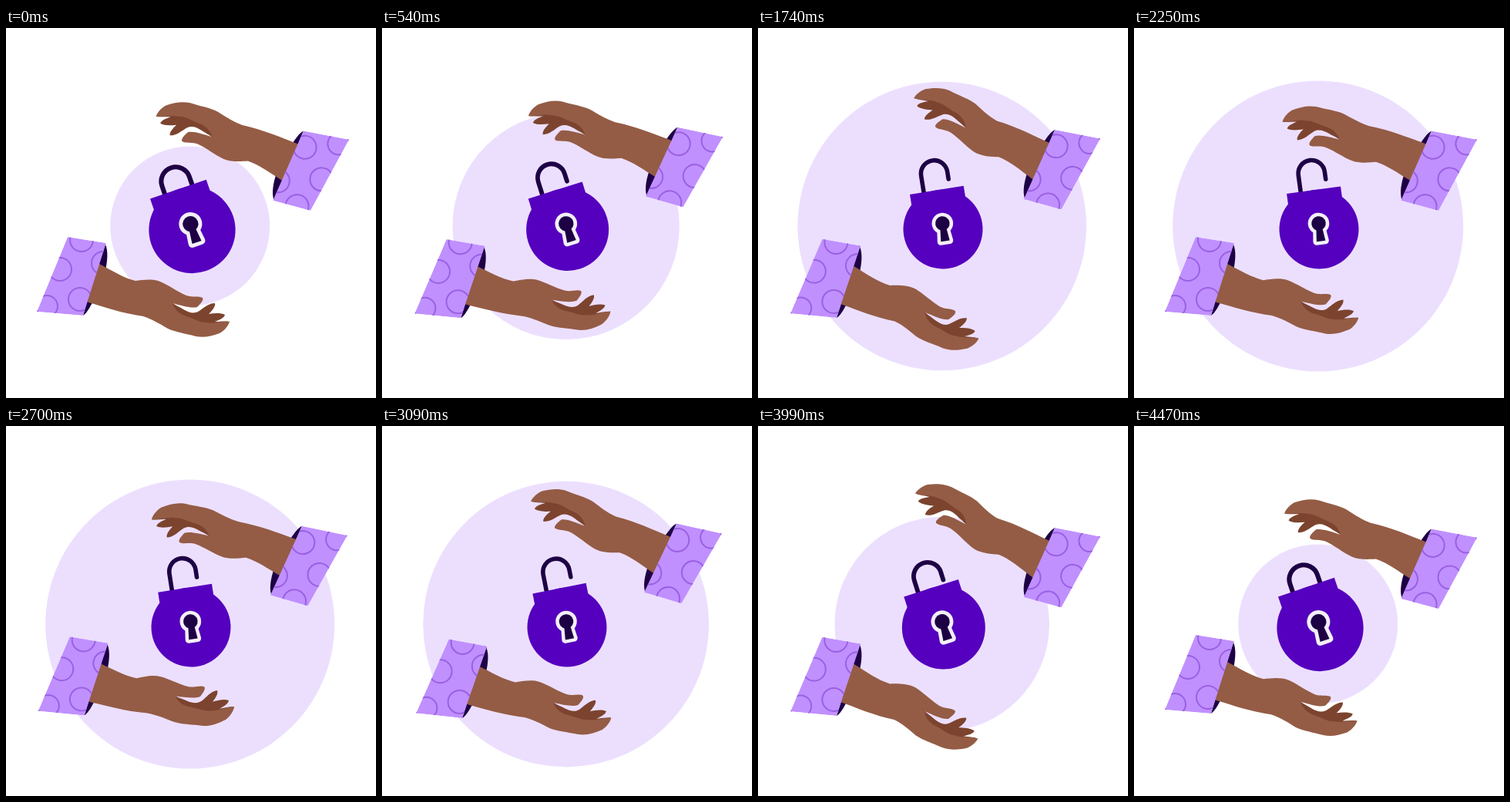
An HTML page that plays this animation: 480 px wide and 480 px high, repeating every 4500 ms.

```html
<!DOCTYPE html>
<html lang="en">
<head>
<meta charset="utf-8">
<title>Hands and padlock</title>
<style>
html, body { margin: 0; width: 100%; height: 100%; overflow: hidden; background: #fff; }
svg { display: block; width: 100vw; height: 100vh; }
</style>
</head>
<body>
<svg viewBox="0 0 480 480">
  <defs>
    <clipPath id="cuff"><path d="M40,368 L80,271 L130,279 L100,373Z"/></clipPath>
    <path id="star" d="M0,-1 Q.16,-.16 1,0 Q.16,.16 0,1 Q-.16,.16 -1,0 Q-.16,-.16 0,-1Z"/>
    <g id="sleeve" clip-path="url(#cuff)">
      <path d="M40,368 L80,271 L130,279 L100,373Z" fill="#c090ff"/>
      <g fill="none" stroke="#9a60e2" stroke-width="2">
        <circle cx="98" cy="275" r="15"/>
        <circle cx="70" cy="313" r="15"/>
        <circle cx="126" cy="305" r="15"/>
        <circle cx="96" cy="352" r="15"/>
        <circle cx="53" cy="361" r="14"/>
      </g>
    </g>
    <path id="lining" fill="#1e0045" d="M128,278.700 C136,292 129,325 117,346 C110,361 105,370 100,373Z"/>
  </defs>
  <circle id="halo" cx="238.700" cy="257" fill="#ecdffe"/>
  <g id="stars" fill="#c79bfc"></g>
  <g id="lock">
    <path id="shackle" d="M-17,-40 V-73 A17.200 17.200 0 0 1 17.400,-73 V-63" fill="none"
      stroke="#1e0045" stroke-width="5.600" stroke-linecap="round"/>
    <g fill="#5500be">
      <circle r="51.500"/>
      <rect x="-35.300" y="-51.300" width="70.600" height="18"/>
    </g>
    <g transform="translate(.5 -7.500)">
      <g fill="#f3f0f8" stroke="#f3f0f8" stroke-width="9" stroke-linejoin="round">
        <circle r="9.300"/><path d="M-3.500,5 L-5.800,23.200 H5.800 L3.500,5Z"/>
      </g>
      <g fill="#1e0045">
        <circle r="9.300"/><path d="M-3.800,5 L-5.800,23.200 H5.800 L3.800,5Z"/>
      </g>
    </g>
  </g>
  <g id="arms"></g>
</svg>
<script>
const LOOP = 4500, HALF = LOOP / 2, TAU = Math.PI * 2;
const $ = id => document.getElementById(id);
const clamp = v => Math.max(0, Math.min(1, v));
const ease = v => (1 - Math.cos(Math.PI * clamp(v))) / 2;
const wave = phase => (1 - Math.cos(TAU * phase)) / 2;

function add(parent, tag, attrs) {
  const el = document.createElementNS("http://www.w3.org/2000/svg", tag);
  for (const k in attrs) el.setAttribute(k, attrs[k]);
  return parent.appendChild(el);
}

const FINGERS = "M214,355 C221,361 226,362 230,365 C237,369 243,371 249,368 C256,364 262,357 271,357 " +
  "C272,361 268,366 263,371 C270,370 278,369 284,372 C283,376 278,378 271,381 " +
  "C278,381 284,380 290,381 L270,390 C248,391 220,384 214,355Z";
const SKIN = "M98,294 L121,306 C138,315 152,324 168,328 C176,327 190,325 200,329 " +
  "C212,334 222,342 234,347 C242,350 250,347 255,350 C257,353 252,358 248,362 " +
  "C240,364 228,360 216,357 C219,366 225,371 234,374 C244,377 250,382 260,382 " +
  "C270,384 280,380 290,381 C288,388 281,394 277,396 C266,400 257,402 246,400 " +
  "C232,396 221,395 210,390 C198,383 190,378 178,374 C150,370 128,362 107,356 L94,351Z";

function turn([x, y], cx, cy, a) {
  const c = Math.cos(a), s = Math.sin(a), dx = x - cx, dy = y - cy;
  return [cx + dx * c - dy * s, cy + dx * s + dy * c];
}

// Rotates the forearm at the cuff and the hand at the wrist.
function bend(path, h) {
  return path.replace(/([\d.]+),([\d.]+)/g, (_, x, y) => {
    const wrist = ease((x - 150) / 60);
    const p = turn([+x, +y], 182, 352, 0.085 * h * wrist);
    return turn(p, 112, 333, 0.062 * h).map(v => v.toFixed(2)).join();
  });
}

function makeArm(transform) {
  const root = add($("arms"), "g", { transform });
  const body = add(root, "g", {});
  const lining = add(body, "use", { href: "#lining" });
  const fingers = add(body, "path", { fill: "#7c442e" });
  const skin = add(body, "path", { fill: "#945c45" });
  const sleeve = add(body, "use", { href: "#sleeve" });
  return (sway, h) => {
    body.setAttribute("transform", `translate(${6.3 * sway} ${6.7 * sway})`);
    const tilt = `rotate(${1.7 * sway} 88 323)`;
    lining.setAttribute("transform", tilt);
    sleeve.setAttribute("transform", tilt);
    fingers.setAttribute("d", bend(FINGERS, h));
    skin.setAttribute("d", bend(SKIN, h));
  };
}

const leftArm = makeArm("");
const rightArm = makeArm("translate(445.2 145) rotate(186) translate(-40 -368)");

// x, y, size, angle
const stars = [
  [141, 187, 15.5, 35], [160, 139, 5.5, 15], [102, 224, 7.5, 5],
  [360, 260, 7.5, 40], [340, 312, 11, 15], [348, 350, 5.8, 10]
].map(s => [add($("stars"), "use", { href: "#star" }), ...s]);

function draw(t) {
  const phase = t / HALF;
  const open = ease(t / 1000) * (1 - ease((t - 3450) / 1030));
  const shut = 1 - open;
  const breath = wave(t / LOOP);

  $("halo").setAttribute("r", 103.5 + 75 * open + 10 * breath);

  const angle = -18.9 + 11.1 * breath;
  $("lock").setAttribute("transform",
    `translate(${240 + 1.5 * shut} ${261 + shut}) rotate(${angle}) scale(${1 + 0.09 * shut})`);
  $("shackle").setAttribute("transform", `translate(0 ${12 * shut})`);

  const grow = ease((t - 500) / 400), fade = 1 - ease((t - 1150) / 350);
  for (const [el, x, y, size, rot] of stars) {
    const k = 0.8 + 0.2 * grow;
    const sx = 239 + (x - 239) * k, sy = 257 + (y - 257) * k;
    el.setAttribute("transform",
      `translate(${sx} ${sy}) rotate(${rot}) scale(${size * grow * fade})`);
  }

  leftArm(wave(phase), 0.06 + 0.25 * shut - Math.cos(TAU * (phase - 0.2)));
  rightArm(wave(phase + 0.06), 0.03 + 0.35 * shut - 1.14 * Math.cos(TAU * (phase - 0.12)));
}

const start = performance.now();
function tick() {
  draw((performance.now() - start) % LOOP);
  requestAnimationFrame(tick);
}
tick();
</script>
</body>
</html>
```
